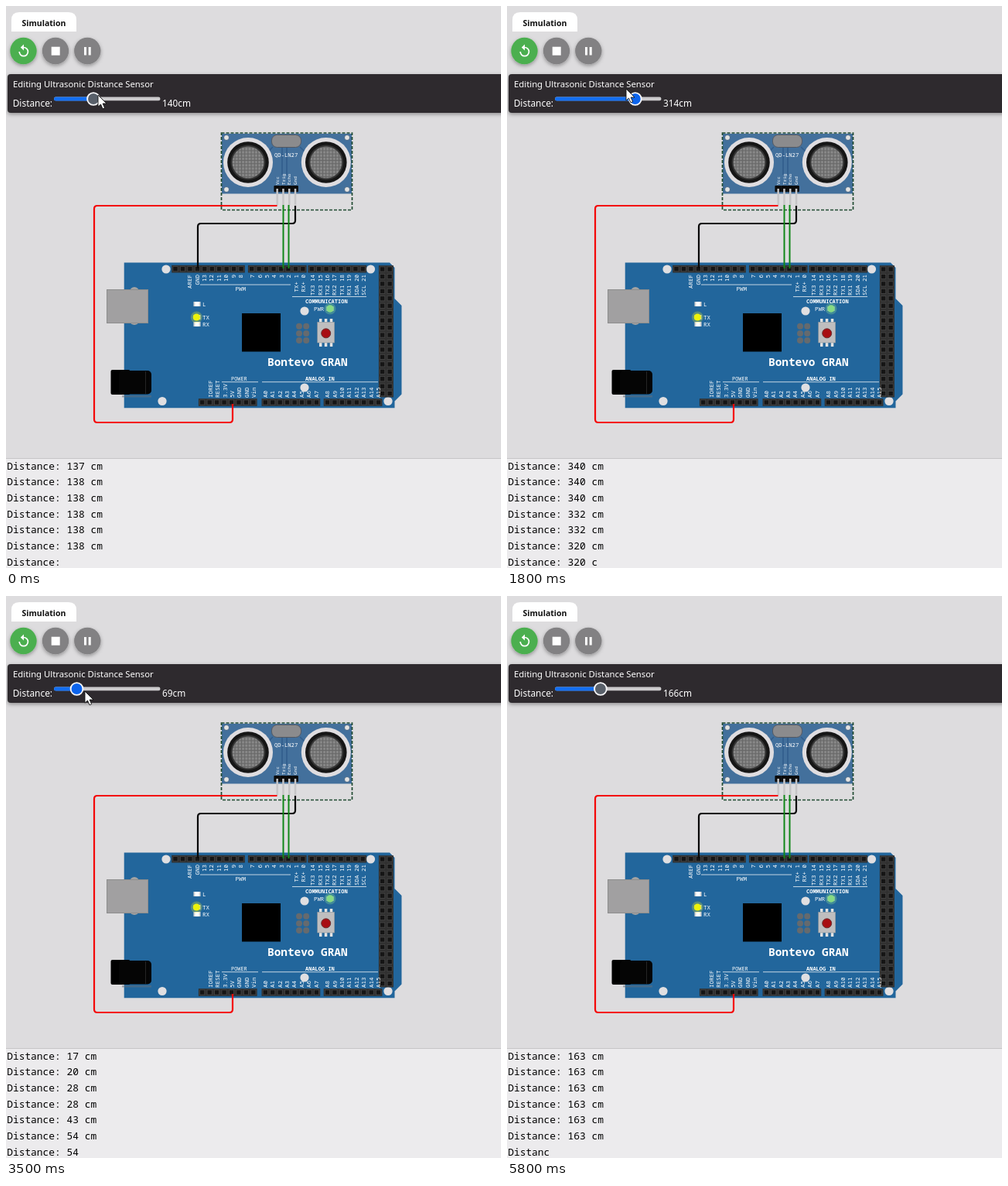
Write an HTML page that moves like this. It is 640x726 px and loops after 5900 ms.

```html
<!DOCTYPE html>
<html lang="en">
<head>
<meta charset="utf-8">
<title>Distance sensor simulation</title>
<style>
  html, body { margin: 0; width: 100%; height: 100%; overflow: hidden; background: #dddcde; }
  svg { display: block; }
  text { white-space: pre; }
  .ui { font-family: "Noto Sans", "Open Sans", sans-serif; }
  .mono { font-family: "Noto Sans Mono", "DejaVu Sans Mono", monospace; }
</style>
</head>
<body>
<svg id="stage" width="640" height="726" viewBox="0 0 640 726"></svg>
<script>
const LOOP = 5900, STEP = 100, LINE = 18;

// ---- markup helpers ----
const rect = (x, y, w, h, fill, more = '') =>
  `<rect x="${x}" y="${y}" width="${w}" height="${h}" fill="${fill}" ${more}/>`;
const disc = (x, y, r, fill, more = '') =>
  `<circle cx="${x}" cy="${y}" r="${r}" fill="${fill}" ${more}/>`;
const path = (d, stroke, width = 2, more = '') =>
  `<path d="${d}" fill="none" stroke="${stroke}" stroke-width="${width}" ${more}/>`;
const text = (x, y, size, str, more = '', font = 'mono', fill = '#fff') =>
  `<text class="${font}" x="${x}" y="${y}" font-size="${size}" fill="${fill}" ${more}>${str}</text>`;
const upright = (x, y, size, str, anchor = 'start') =>
  text(0, 0, size, str, `text-anchor="${anchor}" transform="translate(${x} ${y}) rotate(-90)"`);
const many = (n, f) => Array.from({ length: n }, (_, i) => f(i)).join('');

const PITCH = 9.45;
const socket = (x, y) =>
  rect(x - 3.1, y - 3.1, 6.2, 6.2, '#151515', 'stroke="#484848" stroke-width=".8"');
const header = (x, y, cols, rows = 1) =>
  rect(x - 4.8, y - 4.8, (cols - 1) * PITCH + 9.6, (rows - 1) * PITCH + 9.6, '#303030') +
  many(cols * rows, i => socket(x + (i % cols) * PITCH, y + Math.floor(i / cols) * PITCH));
const labels = (x, y, names, anchor) =>
  names.map((s, i) => upright(x + i * PITCH + 2.6, y, 7.5, s, anchor)).join('');
const rule = (x1, x2, y) => path(`M${x1} ${y}H${x2}`, '#d5e1ea', .9);
const hole = (x, y) => disc(x, y, 5.6, '#e0dfe1');

function toolbar() {
  const button = (x, fill) => disc(x, 58, 17.2, fill, 'filter="url(#soft)"');
  return `<path d="M7 33V18Q7 8 17 8H81Q91 8 91 18V33Z" fill="#fff"/>` +
    text(20.5, 25.8, 10.5, 'Simulation', 'font-weight="700"', 'ui', '#111') +
    button(22.5, '#4caf50') + button(64, '#828183') + button(105.3, '#828183') +
    path('M22.8 53.5A5.6 5.6 0 1 1 17.2 59.1', '#fff', 1.7) +
    '<path d="M23 49.5V57.5L18.8 53.5Z" fill="#fff"/>' +
    rect(58.7, 52.7, 11, 11, '#fff') +
    rect(101, 53, 3, 10.5, '#fff') + rect(106.7, 53, 3, 10.5, '#fff');
}

function panel() {
  return rect(2, 88, 645, 50, '#2d2c2f', 'rx="4" filter="url(#soft)"') +
    text(9, 105, 11.3, 'Editing Ultrasonic Distance Sensor', '', 'ui') +
    text(8.7, 130.3, 11.9, 'Distance:', '', 'ui') +
    rect(62, 117.6, 137.5, 4.6, '#cbcacc', 'rx="2.3"') +
    rect(62, 117.4, 50, 5, '#146ff0', 'rx="2.5" id="fill"') +
    disc(113, 120, 7.9, '#146ff0', 'id="knob" stroke="#f6f6f8" stroke-width="1.9"') +
    text(202, 130.3, 11.8, '', 'id="value"', 'ui');
}

function sensor() {
  const eye = x => disc(x, 202, 32, '#dfdde0') + disc(x, 202, 26.8, '#161616') +
    disc(x, 202, 22.5, '#343434') + disc(x, 202, 20.5, 'url(#mesh)');
  return rect(279, 165, 168, 77.5, '#43709c') +
    [285, 441].map(x => [170, 237].map(y =>
      disc(x, y, 3.5, '#e2e2e2', 'stroke="#315577" stroke-width=".8"')).join('')).join('') +
    path('M357 182V218M363 182V218M345 182L336 191M380 182L389 191', '#315d8c', 1.6) +
    eye(313) + eye(413.8) +
    rect(343.5, 166.5, 38, 16, '#8b8b8d', 'rx="7" stroke="#535861"') +
    text(347, 194.8, 7.2, 'QD-LN27') +
    ['Vcc', 'Trig', 'Echo', 'Gnd'].map((s, i) => {
      const x = 350.7 + i * 7.8;
      return upright(x + 2, 231, 6, s) + rect(x - 4.3, 232, 8.1, 8.3, '#0b0b0b', 'rx="1"') +
        rect(x - 1.3, 236, 2.5, 21.5, '#c6c5c7');
    }).join('') +
    path('M278.5 164H447.5V263.5H278.5Z', '#214b32', 1.7, 'stroke-dasharray="4 2"');
}

function board() {
  const led = (y, x = 242.5) => rect(x, y - 3, 9, 6, '#d6d6d6') + rect(x + 2, y - 3, 5, 6, '#fff');
  const outline = 'M152.7 331.5H496L502.5 338V378L511.5 387V501.5L502.5 510.5V519.3H152.7Z';
  return `<path d="${outline}" fill="#22669c"/>` +
    hole(207, 340) + hole(471.5, 340) + hole(386, 394) +
    hole(386, 493) + hole(202, 510.5) + hole(494, 510.5) +
    // USB socket and power jack
    disc(166, 369, 6, '#a3a3a3') + disc(166, 406, 6, '#a3a3a3') +
    rect(130.5, 366.5, 53, 43, '#a1a0a1', 'stroke="#8d8d8d"') +
    rect(150, 503, 38, 2.5, '#66717c', 'opacity=".5"') +
    rect(135.5, 470, 25, 32, '#000', 'rx="2"') + rect(146, 471, 42, 30.5, '#050505', 'rx="5"') +
    path('M180.5 472V501', '#242424', 1) +
    // Chip, programming pins, reset key
    rect(305, 397, 50, 49.5, '#000') +
    many(6, i => disc(379 + (i % 2) * 9.2, 413.7 + Math.floor(i / 2) * 9.2, 4, '#656a6e')) +
    [405, 411.8, 418.8].map(x => rect(x, 404, 3.5, 36, '#e4e4e4')).join('') +
    rect(402.7, 408.3, 22, 26.7, '#bfbebf', 'stroke="#8b949b" stroke-width=".6"') +
    disc(413.7, 422.8, 6, '#a80d12', 'stroke="#693030"') +
    // Lights
    led(385) + led(402) + led(411) + led(391, 414.5) +
    disc(246.3, 402, 7.5, '#d6e636', 'opacity=".3"') + disc(246.3, 402, 4.6, '#ecf20c') +
    disc(419, 391, 7.5, '#8ee58d', 'opacity=".3"') + disc(419, 391, 4.7, '#86da84') +
    text(254, 388, 7.5, 'L') + text(254, 405, 7.5, 'TX') + text(254, 413.7, 7.5, 'RX') +
    text(398, 394, 7.3, 'PWR') +
    // Headers and their labels
    header(219, 339.7, 10) + header(317.7, 339.7, 8) + header(395.2, 339.7, 8) +
    header(253.7, 512, 8) + header(335.3, 512, 8) + header(415.5, 512, 8) +
    header(486.7, 340, 2, 18) +
    labels(237.5, 347, ['AREF', 'GND', 13, 12, 11, 10, 9, 8], 'end') +
    labels(318.5, 347, [7, 6, 5, 4, 3, 2, 'TX+ 1', 'RX+ 0'], 'end') +
    labels(396.5, 347, ['TX3 14', 'RX3 15', 'TX2 16', 'RX2 17', 'TX1 18', 'RX1 19', 'SDA 20', 'SCL 21'], 'end') +
    labels(264, 506, ['IOREF', 'RESET', '3.3V', '5V', 'GND', 'GND', 'Vin']) +
    labels(335, 506, [0, 1, 2, 3, 4, 5, 6, 7].map(n => 'A' + n)) +
    labels(415.5, 506, [8, 9, 10, 11, 12, 13, 14, 15].map(n => 'A' + n)) +
    rule(251, 368, 360) + text(296.5, 368, 7.5, 'PWM') +
    rule(370, 466, 375.5) + text(387, 384, 7, 'COMMUNICATION', 'font-weight="700"') +
    rule(279, 326, 485.7) + text(291, 484, 6.9, 'POWER') +
    rule(331, 481, 485.7) + text(387, 484, 7, 'ANALOG IN', 'font-weight="700"') +
    text(338, 465, 14.4, 'Bontevo GRAN', 'font-weight="700"');
}

function wires() {
  return path('M350.5 258H118Q114 258 114 262V534Q114 538 118 538H289Q293 538 293 534V514', '#f40808', 2.2) +
    path('M374 258V277Q374 281 370 281H252Q248 281 248 285V339', '#080808', 2.2) +
    path('M358.5 257V339M365.5 257V339', '#118718');
}

function consoleView() {
  return rect(0, 584, 640, 142, '#ecebed') + path('M0 584.5H640', '#c5c4c7', 1) +
    many(7, i => text(1.2, 598.6 + i * 20.65, 12.9, '', 'data-row', 'mono', '#000'));
}

const stage = document.getElementById('stage');
stage.innerHTML = `<defs>
  <filter id="soft" x="-30%" y="-30%" width="160%" height="170%">
    <feDropShadow dx="0" dy="2" stdDeviation="2.6" flood-opacity=".35"/>
  </filter>
  <pattern id="mesh" width="4.2" height="4.2" patternUnits="userSpaceOnUse">
    <rect width="4.2" height="4.2" fill="#8c8c8c"/>
    <path d="M0 2.1H4.2M2.1 0V4.2" stroke="#686868" stroke-width="1.4"/>
  </pattern></defs>` +
  rect(0, 0, 640, 726, '#dddcde') + toolbar() + panel() + board() + sensor() + wires() + consoleView() +
  `<path id="cursor" d="M0 0V15.2L3.5 12L6 17.8L8.6 16.6L6.1 11H11Z"
    fill="#fff" stroke="#111" stroke-width=".9"/>`;

// ---- motion ----
const distanceKeys = [[0, 140], [150, 140], [1000, 328], [1200, 345], [1500, 345], [1800, 314],
  [2700, 69], [3000, 17], [3150, 17], [3500, 69], [3900, 166]];
const cursorX = [[0, 119], [150, 121], [1000, 172], [1250, 176], [1500, 173], [1800, 154],
  [2700, 87], [3050, 76], [3500, 102], [3900, 121]];
const cursorY = [[0, 115], [1000, 105], [1800, 107], [2700, 125], [3500, 123], [4200, 125]];
const typedKeys = [[0, 9], [1000, 373], [1800, 663], [2700, 976], [3500, 1272], [4400, 1586], [5800, 2095]];

function at(keys, t) {
  const i = keys.findIndex(k => k[0] > t);
  if (i < 0) return keys[keys.length - 1][1];
  const [t0, a] = keys[i - 1], [t1, b] = keys[i];
  return a + (b - a) * (t - t0) / (t1 - t0);
}

// The sensor repeats most readings twice while the slider moves.
const ramp = (a, b, n) => Array.from({ length: n }, (_, i) =>
  Math.round(a + (b - a) * (i + 1 - i % 2) / (n + 1)));
const readings = [137, ...Array(8).fill(138), ...ramp(138, 267, 11),
  267, 267, 281, 281, 295, 295, 303, ...ramp(303, 340, 9),
  340, 340, 340, 332, 332, 320, 320, ...ramp(320, 101, 11),
  101, 101, 101, 96, 96, 84, 84, ...ramp(84, 17, 9),
  17, 20, 28, 28, 43, 54, 54, ...ramp(54, 163, 11)];

const [fill, knob, value, cursor] = ['fill', 'knob', 'value', 'cursor'].map(id => document.getElementById(id));
const rows = stage.querySelectorAll('[data-row]');

function draw(t) {
  const distance = Math.round(at(distanceKeys, t));
  const x = 70.6 + distance * .303;
  fill.setAttribute('width', x - 62);
  knob.setAttribute('cx', x);
  knob.setAttribute('fill', t < 100 || t >= 4400 ? '#59606a' : '#0c64ed');
  value.textContent = distance + 'cm';
  cursor.setAttribute('transform', `translate(${at(cursorX, t)} ${at(cursorY, t)})`);
  cursor.setAttribute('visibility', t < 4400 ? 'visible' : 'hidden');

  const typed = Math.round(at(typedKeys, t));
  const first = Math.floor(typed / LINE);
  rows.forEach((row, i) => {
    const line = `Distance: ${readings[first + i] ?? 163} cm`;
    row.textContent = i < 6 ? line : line.slice(0, typed % LINE);
  });
}

const start = performance.now();
function tick() {
  const t = (performance.now() - start) % LOOP;
  draw(Math.floor(t / STEP) * STEP);
  requestAnimationFrame(tick);
}
tick();
</script>
</body>
</html>
```
